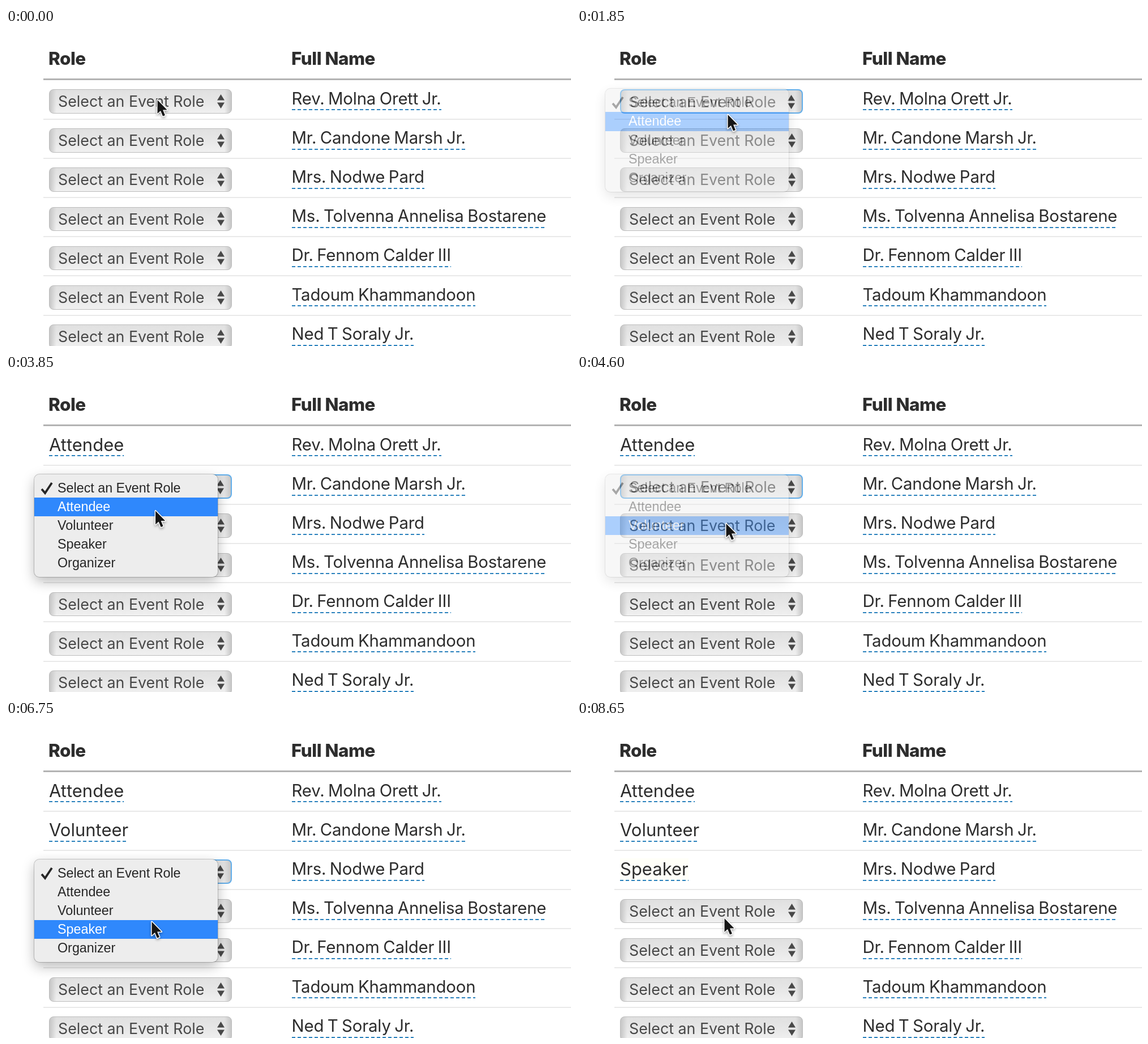
An HTML page that plays this animation: 998x561 px, repeating every 8700 ms.

```html
<!DOCTYPE html>
<html lang="en">
<head>
<meta charset="utf-8">
<title>Event roles</title>
<style>
  html, body { margin: 0; width: 100%; height: 100%; overflow: hidden; background: #fff; }
  #stage { position: relative; width: 998px; height: 561px; overflow: hidden;
    font-family: Inter, sans-serif; font-weight: 430; color: #2d2d2d; white-space: nowrap; }
  #stage > *, .row > * { position: absolute; }
  .head { top: 33.6px; line-height: 40px; font-size: 31.4px; font-weight: 800; letter-spacing: -.5px; }
  .rule { left: 66px; right: 0; top: 88.5px; height: 3.5px; background: #b3b3b3; }
  .row { left: 66px; right: 0; height: 69.2px; }
  .row::after { content: ""; position: absolute; left: 0; right: 0; top: 67.6px; height: 2px; background: #e9e9e9; }
  .link { top: 13.6px; height: 39.9px; line-height: 38.4px; }
  .link::after { content: ""; position: absolute; left: 0; right: 0; bottom: 0; height: 2px;
    background: repeating-linear-gradient(90deg, #2b82bd 0 6px, transparent 6px 10px); }
  .name { left: 438.5px; font-size: 29.4px; letter-spacing: -.2px; word-spacing: -1.5px; }
  .role { left: 10px; font-size: 31px; }
  .select { left: 9.5px; top: 16px; width: 323.5px; height: 42.5px; box-sizing: border-box;
    border: 1.7px solid #bcbcbc; border-radius: 8px; padding-left: 15.5px;
    font-size: 26.8px; line-height: 40px; color: #484848;
    background: linear-gradient(90deg, #c6c6c6, #c6c6c600 12px calc(100% - 12px), #c6c6c6),
      linear-gradient(#e0e0e0, #e7e7e7 50%, #f0f0f0); }
  .select.focus { border: 2px solid #62aeea; }
  .select svg { position: absolute; right: 12px; top: 7.5px; fill: #484848; }
  #menu { left: 50px; width: 324px; height: 181.5px; box-sizing: border-box; padding-top: 8px;
    background: #ededed; border-radius: 9px;
    box-shadow: 0 0 0 1px rgba(0,0,0,.2), 0 8px 22px rgba(0,0,0,.27);
    font: 23.3px/33.2px "Liberation Sans", Arial, sans-serif; color: #262626; }
  .item { position: relative; height: 33.2px; padding-left: 41px; }
  .item.on { background: #2f88fc; color: #fff; }
  .item svg { position: absolute; left: 11px; top: 0; fill: none; stroke: currentColor; stroke-width: 3.8; }
  #cursor { left: 0; top: 0; overflow: visible; filter: drop-shadow(0 2px 2px rgba(0,0,0,.35)); }
</style>
</head>
<body>
<div id="stage">
  <div class="head" style="left:75px">Role</div>
  <div class="head" style="left:504px">Full Name</div>
  <div class="rule"></div>
  <div id="menu"></div>
  <svg id="cursor" width="24" height="36">
    <path d="M.5 1V25L6 20L10 29.6L14 28L10.1 18.6H17.6Z"
      fill="#161616" stroke="#fff" stroke-width="3" paint-order="stroke" stroke-linejoin="round"/>
  </svg>
</div>
<script>
const LOOP = 8700, STEP = 50, PITCH = 69.2, ITEM = 33.2;
const SWAP_DELAY = 850, GLOW = 900;
const options = ['Select an Event Role', 'Attendee', 'Volunteer', 'Speaker', 'Organizer'];
const names = ['Rev. Molna Orett Jr.', 'Mr. Candone Marsh Jr.', 'Mrs. Nodwe Pard',
  'Ms. Tolvenna Annelisa Bostarene', 'Dr. Fennom Calder III', 'Tadoum Khammandoon', 'Ned T Soraly Jr.'];
// One pick per row: when the menu opens, when it is clicked, which option is taken.
const picks = [
  { open: 800, click: 1600, option: 1 },
  { open: 3400, click: 4350, option: 2 },
  { open: 6150, click: 7050, option: 3 },
];
// Pointer stops: time, x, y.
const path = [
  [0, 267, 126], [1150, 267, 126], [1400, 266, 152], [2950, 266, 152], [3350, 265, 188],
  [3500, 265, 188], [4050, 263, 263], [6150, 263, 263], [6750, 257, 355], [7500, 257, 355],
  [8200, 260, 349], [LOOP, 260, 349],
];

const stage = document.getElementById('stage');
const menu = document.getElementById('menu');
const cursor = document.getElementById('cursor');
const clamp = v => Math.min(1, Math.max(0, v));
const smooth = v => v * v * (3 - 2 * v);

function add(parent, className, text = '') {
  const el = document.createElement('div');
  el.className = className;
  el.textContent = text;
  return parent.appendChild(el);
}

const rows = names.map((name, i) => {
  const row = add(stage, 'row');
  row.style.top = 92 + i * PITCH + 'px';
  stage.insertBefore(row, menu);
  add(row, 'link name', name);
  const select = add(row, 'select');
  const label = document.createElement('span');
  label.textContent = options[0];
  select.append(label);
  select.insertAdjacentHTML('beforeend',
    '<svg width="13" height="25"><path d="M0 10.5L6.5 0L13 10.5ZM0 14.5H13L6.5 25Z"/></svg>');
  const role = picks[i] && add(row, 'link role', options[picks[i].option]);
  return { select, label, role };
});

const items = options.map(text => add(menu, 'item', text));
items[0].insertAdjacentHTML('beforeend',
  '<svg width="24" height="33"><path d="M2 18L8 25L20 7"/></svg>');

function pointerAt(t) {
  const n = path.findIndex(stop => stop[0] > t);
  const [t0, x0, y0] = path[n - 1], [t1, x1, y1] = path[n];
  const k = smooth((t - t0) / (t1 - t0));
  return [x0 + (x1 - x0) * k, y0 + (y1 - y0) * k];
}

function render(t) {
  const [x, y] = pointerAt(t);
  cursor.style.transform = `translate(${x}px, ${y}px)`;
  let menuOpacity = 0;

  picks.forEach(({ open, click, option }, i) => {
    const { select, label, role } = rows[i];
    const since = t - click;
    const done = since >= SWAP_DELAY;
    select.style.display = done ? 'none' : '';
    select.classList.toggle('focus', t >= open);
    label.textContent = options[since >= 400 ? option : 0];
    role.style.display = done ? '' : 'none';
    const glow = 1 - smooth(clamp((since - SWAP_DELAY) / GLOW));
    role.style.backgroundColor = `rgba(252, 245, 158, ${glow})`;

    if (t >= open && since < 350) {
      const top = 107.3 + i * PITCH;
      const hover = Math.floor((y - top - 8) / ITEM);
      const blink = since >= 0 && since < STEP;
      menu.style.top = top + 'px';
      menuOpacity = 1 - clamp((since - 100) / 250);
      items.forEach((item, n) => item.classList.toggle('on', n === hover && !blink));
    }
  });
  menu.style.opacity = menuOpacity;
}

function tick() {
  render(Math.floor(performance.now() % LOOP / STEP) * STEP);
  requestAnimationFrame(tick);
}
tick();
</script>
</body>
</html>
```
